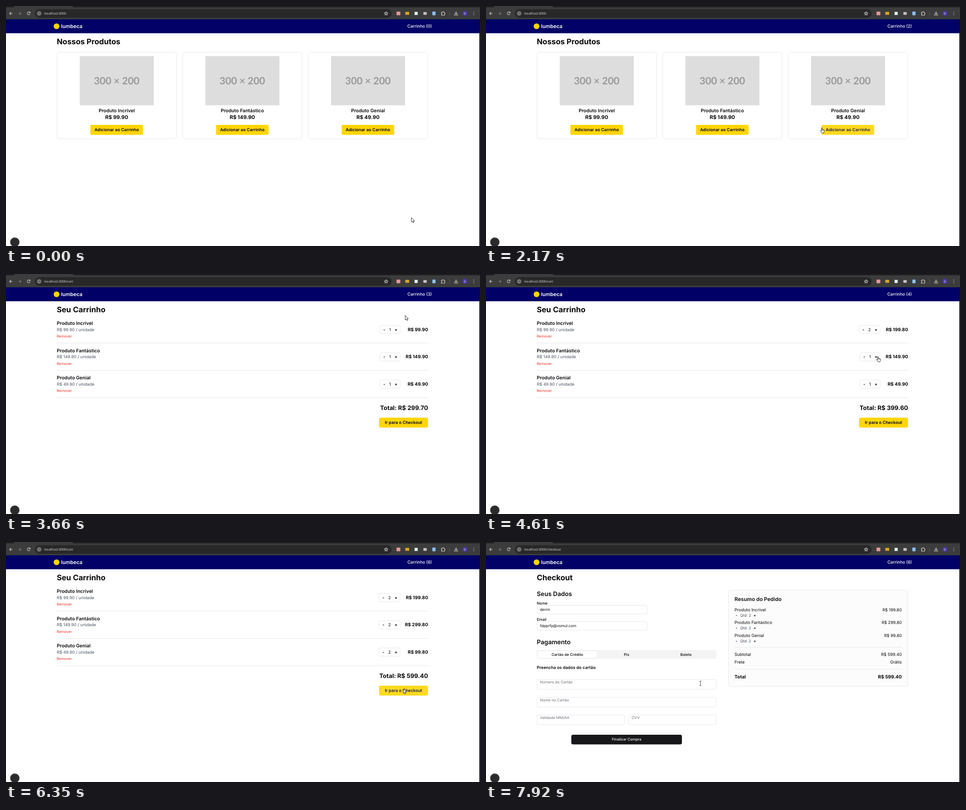
Write an HTML page that moves like this. It is 1050 px wide and 533 px high and loops after 7990 ms.

```html
<!DOCTYPE html>
<html lang="pt-BR">
<head>
<meta charset="utf-8">
<title>Loja</title>
<style>
  html, body { margin: 0; height: 100%; overflow: hidden; background: #fff; }
  svg { display: block; width: 100vw; height: 100vh; }
  text { font-family: Inter, sans-serif; text-rendering: geometricPrecision; white-space: pre; }
  .url { font-family: "Open Sans", "Noto Sans", sans-serif; }
  .placeholder { font-family: Lato, sans-serif; }
</style>
</head>
<body>
<svg viewBox="0 0 1050 533">
  <g id="view"></g>
  <g id="cursor"></g>
</svg>
<script>
const LOOP = 7990;
const INK = '#0a0a0a', GRAY = '#4b5563', MUTED = '#71717a', LINE = '#e5e7eb', GOLD = '#ffd600', NAVY = '#000066';

const products = [
  { name: 'Produto Incrível', price: 99.9, clicks: [1150, 3990] },
  { name: 'Produto Fantástico', price: 149.9, clicks: [1970, 4870] },
  { name: 'Produto Genial', price: 49.9, clicks: [2500, 5400] },
];
const CART_AT = 3450, CHECKOUT_AT = 6420;
const loading = t => (t >= 3310 && t < CART_AT) || (t >= 6280 && t < CHECKOUT_AT);

// Cursor path: time, x, y
const path = [
  [0, 898, 470], [70, 898, 470], [560, 345, 332], [810, 295, 293], [880, 284, 284], [1150, 284, 284],
  [1890, 512, 282], [1970, 513, 281], [2170, 743, 270], [2380, 785, 276], [2500, 785, 276],
  [2700, 860, 165], [3050, 914, 43], [3400, 914, 43], [3850, 866, 122], [3990, 866, 122],
  [4560, 868, 183], [4870, 868, 183], [5210, 867, 244], [5400, 867, 244], [6150, 880, 326],
  [6420, 880, 326], [7020, 613, 308], [7300, 521, 308], [7780, 521, 308], [7920, 475, 314], [LOOP, 475, 314],
];

function slope(i, axis) {
  const prev = path[i - 1], here = path[i], next = path[i + 1];
  if (!prev || !next) return 0;
  const turns = (here[axis] - prev[axis]) * (next[axis] - here[axis]) <= 0;
  return turns ? 0 : (next[axis] - prev[axis]) / (next[0] - prev[0]);
}

function cursorAt(t) {
  const i = Math.max(0, path.findIndex(p => p[0] > t) - 1);
  const a = path[i], b = path[i + 1], span = b[0] - a[0], u = (t - a[0]) / span;
  const s = u * u * (3 - 2 * u);
  return [1, 2].map(k => a[k] + (b[k] - a[k]) * s
    + span * u * (1 - u) * (slope(i, k) * (1 - u) - slope(i + 1, k) * u));
}

const money = v => 'R$ ' + v.toFixed(2);
const text = (x, y, str, size, weight = 400, fill = INK, anchor = 'start', cls = '') =>
  `<text x="${x}" y="${y}" font-size="${size}" font-weight="${weight}" fill="${fill}" text-anchor="${anchor}" class="${cls}">${str}</text>`;
const rect = (x, y, w, h, fill, r = 0, stroke = 'none') =>
  `<rect x="${x}" y="${y}" width="${w}" height="${h}" rx="${r}" fill="${fill}" stroke="${stroke}"/>`;
const circle = (x, y, r, fill, stroke = 'none') =>
  `<circle cx="${x}" cy="${y}" r="${r}" fill="${fill}" stroke="${stroke}"/>`;
const icon = (d, color = '#d0d0d0') =>
  `<path d="${d}" fill="none" stroke="${color}" stroke-width="1.1" stroke-linejoin="round"/>`;
const rule = (x, y, w) => rect(x, y, w, 1, LINE);
const right = (y, str, size, weight, x = 935) => text(x, y, str, size, weight, INK, 'end');

function goldButton(x, y, w, label, r, hovered) {
  return `<g opacity="${hovered ? 0.88 : 1}">` + rect(x, y, w, 22, GOLD, r)
    + text(x + w / 2, y + 14, label, 9.35, 600, '#00002e', 'middle') + '</g>';
}

function chrome(urlPath, count) {
  return rect(0, 0, 1050, 30, '#3c3c3c') + rect(0, 0, 18, 3, '#1f2020') + rect(148, 0, 902, 3, '#1f2020')
    + rect(64, 7, 790.5, 19, '#282828', 9.5) + circle(73.5, 16.5, 6.5, '#3c3c3c')
    + icon('M14.5 16.5H8M11 13.5L8 16.5 11 19.5')
    + icon('M27 16.5H33.500M30.500 13.500L33.500 16.500 30.500 19.500', '#7c7c7c')
    + icon('M53 14.5A3.200 3.200 0 1 0 53.300 17.500M53.500 12.800V15.200H51')
    + circle(73.5, 16.5, 3.4, 'none', '#d0d0d0') + rect(73, 16, 1, 2.5, '#d0d0d0') + rect(73, 14.2, 1, 1, '#d0d0d0')
    + text(85, 19.2, 'localhost:3000' + urlPath, 7.15, 400, '#e6e6e6', 'start', 'url')
    + icon('M842 12.5L843.100 15.200 846 15.400 843.800 17.200 844.500 20 842 18.500 839.500 20 840.200 17.200 838 15.400 840.900 15.200Z')
    + rect(865, 12.5, 8.5, 8, '#e7949b', 1) + rect(884.5, 13, 8.5, 6.5, '#d9a520')
    + rect(905, 13, 7, 7, '#dcecee') + rect(924.5, 13.5, 7.5, 6, '#c4c4c4', 1) + rect(944.5, 12.5, 7, 8, '#8cc4f2')
    + icon('M964.500 14H967V12.800H969V14H971.500V16H972.500V18H971.500V20.500H964.500V18.500H965.500V16.500H964.500Z')
    + rect(982, 12, 1, 9, '#5c5c5c')
    + icon('M997 12V18M994.500 15.500L997 18 999.500 15.500M993.300 18V20.300H1000.700V18')
    + circle(1016.5, 16.3, 5.7, '#4a35a8') + text(1016.5, 18.7, 'D', 6.3, 400, '#e8e4ff', 'middle')
    + [13, 16.2, 19.4].map(y => circle(1036.3, y, 0.8, '#d0d0d0')).join('')
    + rect(0, 29.5, 1050, 31, NAVY) + circle(112, 45, 6.3, GOLD)
    + text(122, 48.5, 'lumbeca', 11.4, 600, '#fff') + text(943.5, 48, `Carrinho (${count})`, 9.4, 500, '#fff', 'end')
    + circle(19.5, 524.5, 10.3, '#2b2b2b', '#8a8a8a') + rect(1048.5, 29.5, 1.5, 503.5, '#111');
}

const title = str => text(112.5, 84.7, str, 16.9, 700);

function home(hover) {
  return title('Nossos Produtos') + products.map((p, i) => {
    const x = 113 + 278.3 * i, mid = x + 132.2;
    return rect(x, 102.5, 264.5, 192.5, '#fff', 5, LINE) + rect(x + 50.4, 111.3, 164, 109.2, '#ddd')
      + text(mid, 174, '300 × 200', 22.2, 700, '#999', 'middle', 'placeholder')
      + text(mid, 236, p.name, 10.5, 600, INK, 'middle') + text(mid, 251.2, money(p.price), 11.4, 700, INK, 'middle')
      + goldButton(x + 74, 264, 116.3, 'Adicionar ao Carrinho', 2, hover === 'add' + i);
  }).join('');
}

function cart(qty, total, hover) {
  return title('Seu Carrinho') + products.map((p, i) => {
    const y = 60.6 * i, left = qty[i] > 1 ? 826.5 : 828.5, mid = y + 126.8;
    return text(112.5, y + 113, p.name, 10.5, 600) + text(112.5, mid, money(p.price) + ' / unidade', 9.2, 400, GRAY)
      + text(112.5, y + 141, 'Remover', 8.05, 400, '#e7352c')
      + rect(left, y + 114, 873 - left, 18.5, '#fff', 3, LINE)
      + text(left + 9.5, mid, '-', 9.4, 700, INK, 'middle') + text(left / 2 + 436.4, mid, qty[i], 9.2, 400, INK, 'middle')
      + text(864, mid, '+', 9.4, 700, INK, 'middle')
      + right(mid, money(p.price * qty[i]), 10.1, 700) + rule(112.5, y + 153, 822.5);
  }).join('') + right(301.5, 'Total: ' + money(total), 13.3, 700)
    + goldButton(826.3, 319, 108.5, 'Ir para o Checkout', 4, hover === 'pay');
}

function field(x, y, w, h, str, baseline, color) {
  return rect(x, y, w, h, '#fff', 3.5, LINE) + text(x + 6.5, baseline, str, 8.3, 400, color);
}

function checkout(qty, total) {
  const x = 112.5, sum = 550.5, tab = (cx, str) => text(cx, 252.6, str, 8.25, 500, INK, 'middle');
  return title('Checkout') + text(x, 119.6, 'Seus Dados', 13.6, 600)
    + text(x, 139, 'Nome', 8.4, 500) + field(113, 140.5, 244, 19.5, 'derim', 153, INK)
    + text(x, 175.4, 'Email', 8.4, 500) + field(113, 176.5, 244, 19.5, 'fdpprfp@vomul.com', 189, INK)
    + text(x, 226.6, 'Pagamento', 13.7, 600)
    + rect(x, 240, 398, 19.5, '#f4f4f5', 4) + rect(114, 241.5, 132, 16.5, '#fff', 3, '#ebebed')
    + tab(180, 'Cartão de Crédito') + tab(311.5, 'Pix') + tab(443, 'Boleto')
    + text(x, 282, 'Preencha os dados do cartão', 9.25, 600)
    + field(113, 305.5, 397, 21.5, 'Número do Cartão', 314, MUTED)
    + field(113, 345, 397, 21.5, 'Nome no Cartão', 353.5, MUTED)
    + field(113, 384, 194, 21.5, 'Validade MM/AA', 393, MUTED) + field(316, 384, 194, 21.5, 'CVV', 393, MUTED)
    + rect(189, 428, 245, 21.5, '#18181b', 4) + text(311.5, 441.4, 'Finalizar Compra', 8.1, 500, '#fafafa', 'middle')
    + rect(537, 107, 397.5, 213.5, '#fcfcfc', 5, LINE) + text(sum, 131.2, 'Resumo do Pedido', 11.6, 600)
    + products.map((p, i) => {
      const y = 153.5 + 28.5 * i;
      return text(sum, y, p.name, 9.4) + right(y, money(p.price * qty[i]), 9.1, 400, 921)
        + text(555, y + 12.3, '-', 8.6, 600, INK, 'middle') + text(563, y + 12.3, 'Qtd: ' + qty[i], 8.4, 400, GRAY)
        + text(595.5, y + 12.3, '+', 8.6, 600, INK, 'middle');
    }).join('')
    + rule(sum, 233.5, 370.5) + text(sum, 252.5, 'Subtotal', 9.4) + right(252.5, money(total), 9.3, 400, 921)
    + text(sum, 270, 'Frete', 9.4) + right(270, 'Grátis', 9.4, 400, 921)
    + rule(sum, 282, 370.5) + text(sum, 302.6, 'Total', 10.3, 700) + right(302.6, money(total), 10.3, 700, 921);
}

const inside = (x, y, l, t, r, b) => x >= l && x <= r && y >= t && y <= b;

function target(page, x, y) {
  if (inside(x, y, 889, 39, 944, 51)) return 'link';
  for (let i = 0; i < 3; i++) {
    const left = 187 + 278.3 * i, top = 114 + 60.6 * i;
    if (page === 0 && inside(x, y, left, 264, left + 116.3, 286)) return 'add' + i;
    if (page === 1 && inside(x, y, 857, top, 873, top + 18.5)) return 'plus';
  }
  if (page === 1 && inside(x, y, 826, 319, 935, 341)) return 'pay';
  if (page === 2 && inside(x, y, 113, 305, 510, 327)) return 'field';
  return '';
}

const shapes = {
  arrow: '<path d="M0 0V10L2.300 8 3.900 11.500 5.500 10.800 4 7.400H7.100Z" fill="#fff" stroke="#000" stroke-width=".8"/>',
  hand: '<path d="M-.5 1Q-.5 .2 .3 .2 1.200 .2 1.200 1V4.500Q3.600 4.300 5.200 5.100 6 5.500 5.800 8L5 10.500V12H.2V10.800L-2.700 7.300Q-3 6.200-2 6.200L-.5 7.500Z" fill="#fff" stroke="#000" stroke-width=".8"/>'
    + '<path d="M1.200 4.500V7M2.800 5V7M4.300 5.200V7" fill="none" stroke="#000" stroke-width=".5"/>',
  beam: '<path d="M-2-5H-.7L0-4.500 .7-5H2M0-4.500V4.500M-2 5H-.7L0 4.500 .7 5H2" fill="none" stroke="#222" stroke-width=".9"/>',
};

const view = document.getElementById('view'), cursor = document.getElementById('cursor');
let lastKey = '', lastShape = '';

function render(now) {
  const t = now % LOOP;
  const page = t < CART_AT ? 0 : t < CHECKOUT_AT ? 1 : 2;
  const qty = products.map(p => p.clicks.filter(c => c <= t).length);
  const [x, y] = cursorAt(t);
  const hover = target(page, x, y);

  const key = [page, qty, hover].join();
  if (key !== lastKey) {
    const total = products.reduce((s, p, i) => s + p.price * qty[i], 0);
    const body = [home(hover), cart(qty, total, hover), checkout(qty, total)][page];
    view.innerHTML = chrome(['', '/cart', '/checkout'][page], qty.reduce((a, b) => a + b)) + body;
    lastKey = key;
  }

  const shape = hover === 'field' ? 'beam' : hover && !loading(t) ? 'hand' : 'arrow';
  if (shape !== lastShape) cursor.innerHTML = shapes[lastShape = shape];
  cursor.setAttribute('transform', `translate(${x.toFixed(2)} ${y.toFixed(2)})`);
  requestAnimationFrame(tick);
}

const start = performance.now();
const tick = () => render(performance.now() - start);
tick();
</script>
</body>
</html>
```
